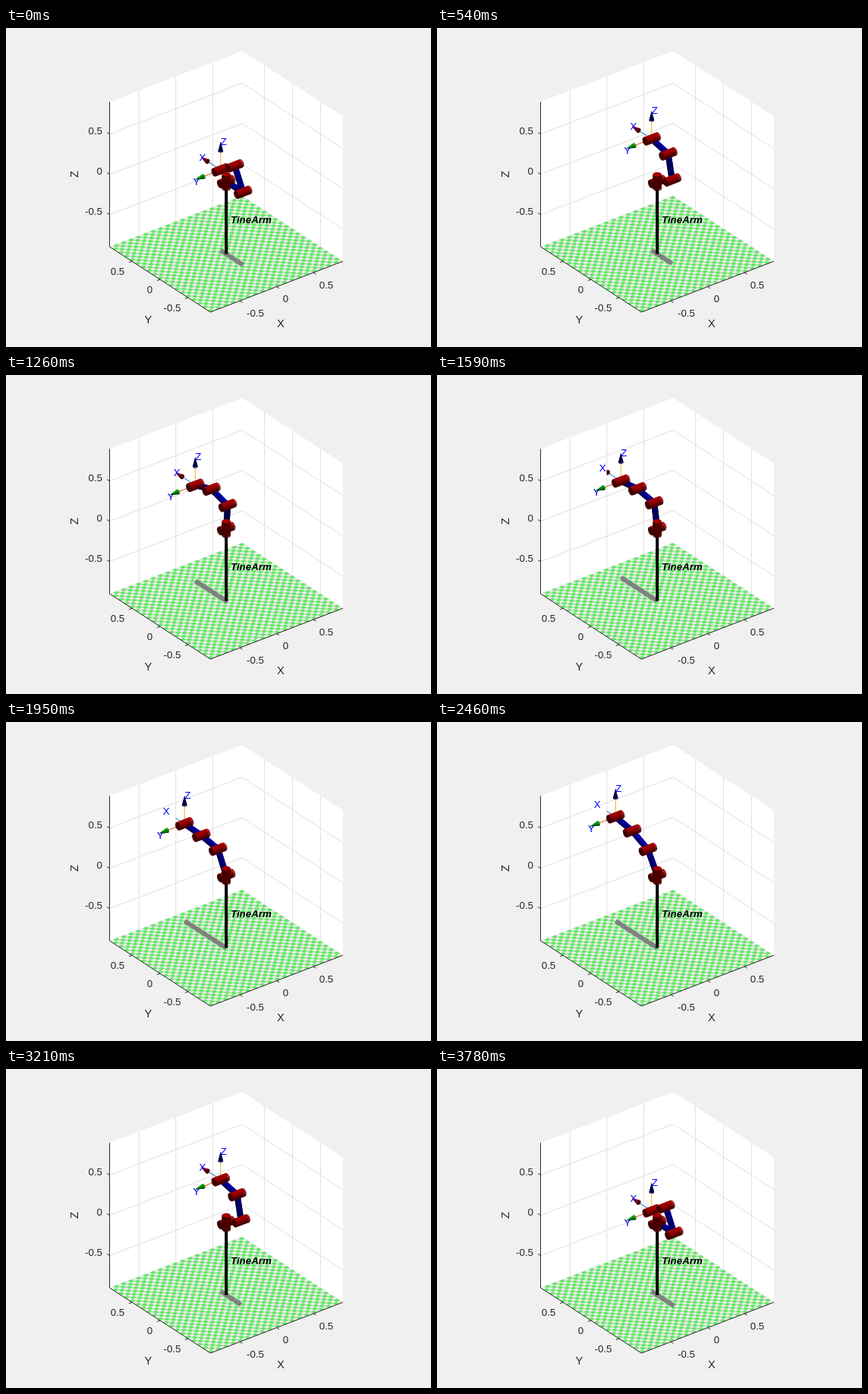
An HTML page with a canvas for the animation above (3.81 s loop, 560x420 px).

```html
<!DOCTYPE html>
<html lang="en">
<head>
<meta charset="utf-8">
<title>Robot arm</title>
<style>
  html, body { margin: 0; width: 100%; height: 100%; overflow: hidden; background: #f0f0f0; }
  canvas { display: block; }
</style>
</head>
<body>
<canvas id="stage" width="560" height="420"></canvas>
<script>
const FONT = '"Liberation Sans", Arial, sans-serif';
const STEP = 30, FRAMES = 127;
const LIM = 0.9, TILE = 0.05, LINK = 0.3, RADIUS = 0.047, HALF = 0.09;
const VIEW = [-0.527, -0.687, 0.5];
const LIGHT = unit([-0.1, -0.2, 0.97]);
const HALFWAY = unit(VIEW.map((v, i) => v + LIGHT[i]));
const RED = [255, 0, 0], BLUE = [0, 0, 255], GREEN = [0, 255, 0];

const stage = document.getElementById('stage');
let ctx = stage.getContext('2d');

function dot(a, b) { return a[0] * b[0] + a[1] * b[1] + a[2] * b[2]; }
function cross(a, b) {
  return [a[1] * b[2] - a[2] * b[1], a[2] * b[0] - a[0] * b[2], a[0] * b[1] - a[1] * b[0]];
}
function unit(a) { return a.map(v => v / Math.hypot(...a)); }
function along(p, dir, d) { return p.map((v, i) => v + dir[i] * d); }
function mix(a, b, s) { return a + (b - a) * s; }

// World coordinates to stage pixels.
function project([x, y, z]) {
  return [290.2 + 97 * x - 73.8 * y, 202.2 - 37.2 * x - 47.8 * y - 106 * z];
}

function trace(points) {
  ctx.beginPath();
  points.forEach(p => ctx.lineTo(...project(p)));
}
function fill(points, color) {
  trace(points);
  ctx.closePath();
  ctx.fillStyle = color;
  ctx.fill();
}
function line(points, color, width = 1) {
  trace(points);
  ctx.strokeStyle = color;
  ctx.lineWidth = width;
  ctx.stroke();
}
function text(str, x, y, size = 13.33, color = '#262626', align = 'center', style = '') {
  ctx.font = `${style} ${size}px ${FONT}`;
  ctx.textAlign = align;
  ctx.textBaseline = 'alphabetic';
  ctx.fillStyle = color;
  ctx.fillText(str, x, y + size * 0.36);
}

function shade(base, normal) {
  const k = 0.2 + 0.45 * Math.max(0, dot(normal, LIGHT));
  const gloss = 45 * Math.pow(Math.max(0, dot(normal, HALFWAY)), 50);
  return `rgb(${base.map(c => Math.round(c * k + gloss)).join()})`;
}

// Cylinder or cone between two points; u and w span its cross-section.
function tube(from, to, u, w, r0, r1, color) {
  const n = 24;
  const normal = i => {
    const a = i / n * 2 * Math.PI;
    return u.map((v, k) => v * Math.cos(a) + w[k] * Math.sin(a));
  };
  const ring = (p, r) => Array.from({ length: n }, (_, i) => along(p, normal(i), r));
  const axis = unit(to.map((v, i) => v - from[i]));
  const back = axis.map(v => -v);

  // A solid silhouette keeps the background out of the seams between strips.
  const side = unit(cross(axis, VIEW));
  fill([along(from, side, r0), along(from, side, -r0), along(to, side, -r1), along(to, side, r1)],
    shade(color, unit(cross(side, axis))));

  for (let i = 0; i < n; i++) {
    const mid = normal(i + 0.5);
    if (dot(mid, VIEW) < 0) continue;
    const a = normal(i), b = normal(i + 1);
    fill([along(from, a, r0), along(from, b, r0), along(to, b, r1), along(to, a, r1)], shade(color, mid));
  }
  if (dot(back, VIEW) > 0) fill(ring(from, r0), shade(color, back));
  else if (r1) fill(ring(to, r1), shade(color, axis));
}

const X = [1, 0, 0], Y = [0, 1, 0], Z = [0, 0, 1];

function joint(p) {
  tube(along(p, X, -HALF), along(p, X, HALF), Y, Z, RADIUS, RADIUS, RED);
}
function waist() {
  joint([0, 0, 0]);
  tube([0, 0, -HALF], [0, 0, HALF], X, Y, RADIUS, RADIUS, RED);
}
function link(a, b) {
  const d = unit(b.map((v, i) => v - a[i]));
  tube(a, b, X, [0, -d[2], d[1]], 0.033, 0.033, BLUE);
}

// Static axes, walls and floor.
function drawScene() {
  ctx.fillStyle = '#f0f0f0';
  ctx.fillRect(0, 0, 560, 420);
  const L = LIM;
  fill([[-L, L, -L], [L, L, -L], [L, L, L], [-L, L, L]], '#fff');
  fill([[L, L, -L], [L, -L, -L], [L, -L, L], [L, L, L]], '#fff');
  for (const v of [-0.5, 0, 0.5]) {
    line([[v, L, -L], [v, L, L]], '#dfdfdf');
    line([[L, v, -L], [L, v, L]], '#dfdfdf');
    line([[-L, L, v], [L, L, v], [L, -L, v]], '#dfdfdf');
  }

  fill([[-L, -L, -L], [L, -L, -L], [L, L, -L], [-L, L, -L]], '#e9e9e9');
  const count = Math.round(2 * L / TILE);
  for (let i = 0; i < count; i++) {
    for (let j = i % 2; j < count; j += 2) {
      const x = -L + i * TILE, y = -L + j * TILE;
      fill([[x, y, -L], [x + TILE, y, -L], [x + TILE, y + TILE, -L], [x, y + TILE, -L]], '#62e962');
    }
  }

  const ink = '#262626';
  line([[-L, L, L], [-L, L, -L], [-L, -L, -L], [L, -L, -L]], ink);
  for (const v of [-0.5, 0, 0.5]) {
    line([[v, -L, -L], [v, -L - 0.045, -L]], ink);
    line([[-L, v, -L], [-L - 0.04, v, -L]], ink);
    line([[-L, L, v], [-L, L + 0.045, v]], ink);
  }
  text('0.5', 127, 135.5, 13.33, ink, 'right');
  text('0', 127, 188.5, 13.33, ink, 'right');
  text('-0.5', 127, 241.7, 13.33, ink, 'right');
  text('0.5', 147, 320);
  text('0', 189.5, 344);
  text('-0.5', 219, 368);
  text('-0.5', 328.5, 375);
  text('0', 368.5, 356);
  text('0.5', 422, 338);
  text('X', 362, 389, 14.67);
  text('Y', 187.5, 384, 14.67);
  ctx.save();
  ctx.translate(89.5, 192.5);
  ctx.rotate(-Math.PI / 2);
  text('Z', 0, 0, 14.67);
  ctx.restore();
}

// Pose: tool position (y, z) and the absolute angle of each link.
function solve(y, z, a3) {
  const ey = y - LINK * Math.cos(a3), ez = z - LINK * Math.sin(a3);
  const dir = Math.atan2(ez, ey);
  const bend = Math.acos(Math.min(1, Math.hypot(ey, ez) / (2 * LINK)));
  return { y, z, angles: [dir + bend, dir - bend, a3] };
}
const pose = (y, z, deg) => solve(y, z, deg * Math.PI / 180);
const home = pose(0.1, 0.1, -33);
const raised = pose(0.1, 0.488, 10.5);
const reach = pose(0.554, 0.288, -16);
const insert = pose(0.745, 0.307, 1.5);
const lift = pose(0.745, 0.395, 7.9);

// Start step, from, to, and whether the joints turn freely or the tool goes straight.
const MOVES = [
  [0, home, raised, false],
  [22, raised, reach, true],
  [43, reach, insert, false],
  [64, insert, lift, false],
  [85, lift, raised, false],
  [106, raised, home, false]
];

function anglesAt(frame) {
  const [start, a, b, free] = MOVES.filter(m => m[0] <= frame).pop();
  const t = Math.min(1, (frame - start) / 20);
  const s = t * t * t * (10 - 15 * t + 6 * t * t);
  const angles = a.angles.map((v, i) => mix(v, b.angles[i], s));
  return free ? angles : solve(mix(a.y, b.y, s), mix(a.z, b.z, s), angles[2]).angles;
}

function arrow(p, dir, u, w, lineColor, headColor) {
  const neck = along(p, dir, 0.23);
  line([p, neck], lineColor);
  tube(neck, along(p, dir, 0.35), u, w, 0.028, 0, headColor);
}

function drawTool(p) {
  ctx.save();
  ctx.beginPath();
  ctx.rect(project([0, LIM, 0])[0], 0, 560, 420);
  ctx.clip();
  arrow(p, Y, X, Z, '#0072bd', RED);
  ctx.restore();
  arrow(p, [-1, 0, 0], Y, Z, '#d95319', GREEN);
  arrow(p, Z, X, Y, '#edb120', BLUE);
}

function drawLabels(p) {
  const [x, y] = project(p);
  text('X', x - 24, y - 17, 13.33, '#00f');
  text('Y', x - 32, y + 15, 13.33, '#00f');
  text('Z', x + 4, y - 37.5, 13.33, '#00f');
}

function drawArm(frame) {
  const points = [[0, 0, 0]];
  for (const a of anglesAt(frame)) {
    points.push(along(points[points.length - 1], [0, Math.cos(a), Math.sin(a)], LINK));
  }
  const tool = points[3];
  const byDepth = (a, b) => a.depth - b.depth;

  const ys = points.map(p => p[1]);
  line([[0, Math.min(...ys), -LIM], [0, Math.max(...ys), -LIM]], '#808080', 6);
  line([[0, 0, -LIM], [0, 0, 0]], '#000', 4);
  text('TineArm', 296, 252.5, 13.33, '#000', 'left', 'italic bold');

  drawTool(tool);
  points.slice(1)
    .map((p, i) => ({ a: points[i], b: p, depth: dot(p, VIEW) + dot(points[i], VIEW) }))
    .sort(byDepth)
    .forEach(l => link(l.a, l.b));
  points
    .map((p, i) => ({ draw: i ? () => joint(p) : waist, depth: dot(p, VIEW) }))
    .sort(byDepth)
    .forEach(j => j.draw());
  drawLabels(tool);
}

const scene = document.createElement('canvas');
scene.width = 560;
scene.height = 420;
const screen2d = ctx;
ctx = scene.getContext('2d');
drawScene();
ctx = screen2d;

const began = performance.now();
function render() {
  const frame = Math.floor(Math.max(0, performance.now() - began) / STEP) % FRAMES;
  ctx.drawImage(scene, 0, 0);
  drawArm(frame);
  requestAnimationFrame(render);
}
render();
</script>
</body>
</html>
```
